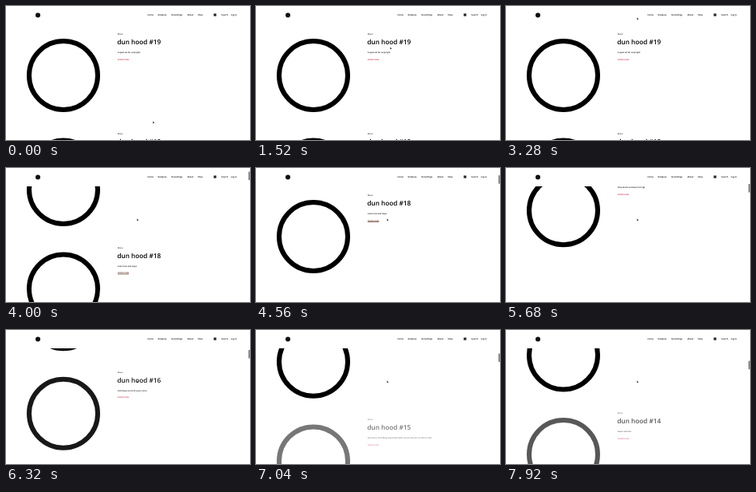
An HTML page with a canvas for the animation above (8000 ms loop, 306 by 168 pixels).

```html
<!DOCTYPE html>
<html lang="en">
<head>
<meta charset="utf-8">
<title>Episode list</title>
<style>
html, body { margin: 0; width: 100%; height: 100%; overflow: hidden; background: #fff; }
canvas { display: block; width: 306px; height: 168px; }
</style>
</head>
<body>
<canvas id="stage"></canvas>
<script>
const W = 306, H = 168, LOOP = 8000, STEP = 80, PITCH = 124.6;
const canvas = document.getElementById('stage');
const ctx = canvas.getContext('2d');
const ratio = window.devicePixelRatio || 1;
canvas.width = W * ratio;
canvas.height = H * ratio;

// fadeAt: when the entry starts to appear; entries without it are always shown
const episodes = [
  { number: 19, note: 'A quiet set for early light' },
  { number: 18, note: 'Late tones and loops', hover: true },
  { number: 17, note: 'Slow drums and warm strings', fadeAt: 4640 },
  { number: 16, note: 'Field tapes and soft piano notes', fadeAt: 5690 },
  { number: 15, note: 'Two hours of drifting sound with bells, voices and rain on old tin roofs', fadeAt: 6730 },
  { number: 14, note: 'Hums and hiss', fadeAt: 7540 }
];
const menu = [[177.5, 'Home'], [190.5, 'Releases'], [207.5, 'Recordings'], [227.5, 'About'], [240.5, 'Shop'], [270, 'Search'], [282, 'Log in']];

const scrollKeys = [[3600, 0], [4000, 60], [4560, 125.6], [5360, 200], [5680, 283], [5960, 323], [6320, 356], [7040, 421], [7120, 428], [7920, 554]];
const cursorKeys = [[800, 185, 146], [1040, 169, 76], [1280, 169, 76], [1520, 169, 53]];
const cursorReturn = [[3280, 165, 16], [3440, 165, 65]];

function along(keys, t, column = 1) {
  if (t <= keys[0][0]) return keys[0][column];
  for (let i = 1; i < keys.length; i++) {
    const a = keys[i - 1], b = keys[i];
    if (t <= b[0]) return a[column] + (b[column] - a[column]) * (t - a[0]) / (b[0] - a[0]);
  }
  return keys[keys.length - 1][column];
}

// CSS "ease": cubic-bezier(.25, .1, .25, 1)
function ease(x) {
  if (x <= 0) return 0;
  if (x >= 1) return 1;
  let low = 0, high = 1, p = x;
  for (let i = 0; i < 16; i++) {
    p = (low + high) / 2;
    const px = 0.75 * p * (1 - p) + p ** 3;
    if (px < x) low = p; else high = p;
  }
  return 0.3 * p * (1 - p) ** 2 + 3 * p * p * (1 - p) + p ** 3;
}

function text(value, x, y, size, color, weight = 400) {
  ctx.font = `${weight} ${size}px "Open Sans", sans-serif`;
  ctx.fillStyle = color;
  ctx.fillText(value, x, y);
}

function drawEpisode({ number, note, hover, fadeAt }, y, t) {
  ctx.globalAlpha = fadeAt ? ease((t - fadeAt) / 1000) : 1;
  ctx.strokeStyle = '#000';
  ctx.lineWidth = 6;
  ctx.beginPath();
  ctx.arc(72, y + 87, 43, 0, 7);
  ctx.stroke();
  text('Mixes', 140, y + 36, 2.4, '#333', 600);
  text('dun hood #' + number, 139.5, y + 48, 8.2, '#000', 600);
  text(note, 140, y + 59, 2.4, '#000', 600);
  const hovered = hover && t >= 3440;
  const linkColor = hovered ? '#5a2a1a' : '#c4203c';
  text('Listen now', 140, y + 67.5, 2.7, linkColor, 600);
  if (hovered) ctx.fillRect(140, y + 68, 14, 0.7);
  ctx.globalAlpha = 1;
}

function drawHeader() {
  ctx.fillStyle = '#fff';
  ctx.fillRect(0, 0, W, 23);
  ctx.fillStyle = '#111';
  ctx.beginPath();
  ctx.arc(40, 11.5, 3, 0, 7);
  ctx.fill();
  for (const [x, label] of menu) text(label, x, 12, 2.6, '#000', 600);
  ctx.fillStyle = '#222';
  ctx.fillRect(260.5, 9.5, 3.2, 3.2);
}

function drawCursor(t) {
  if (t >= 2400 && t < 3280) return;
  const keys = t < 2400 ? cursorKeys : cursorReturn;
  const x = along(keys, t, 1), y = along(keys, t, 2);
  ctx.fillStyle = '#111';
  ctx.beginPath();
  ctx.moveTo(x - 0.6, y - 1.4);
  ctx.lineTo(x + 1.2, y + 0.5);
  ctx.lineTo(x - 0.6, y + 1.3);
  ctx.fill();
}

function draw(now) {
  const t = Math.floor((now % LOOP) / STEP) * STEP;
  const scroll = along(scrollKeys, t);
  ctx.setTransform(ratio, 0, 0, ratio, 0, 0);
  ctx.textRendering = 'geometricPrecision';
  ctx.fillStyle = '#fff';
  ctx.fillRect(0, 0, W, H);
  episodes.forEach((episode, i) => drawEpisode(episode, i * PITCH - scroll, t));
  drawHeader();
  if (scroll > 0) {
    ctx.fillStyle = '#8c8c8c';
    ctx.fillRect(304, 0.5 + scroll * 0.069, 2, 10.5);
  }
  drawCursor(t);
}

const start = performance.now();
function tick() {
  draw(performance.now() - start);
  requestAnimationFrame(tick);
}
tick();
</script>
</body>
</html>
```
